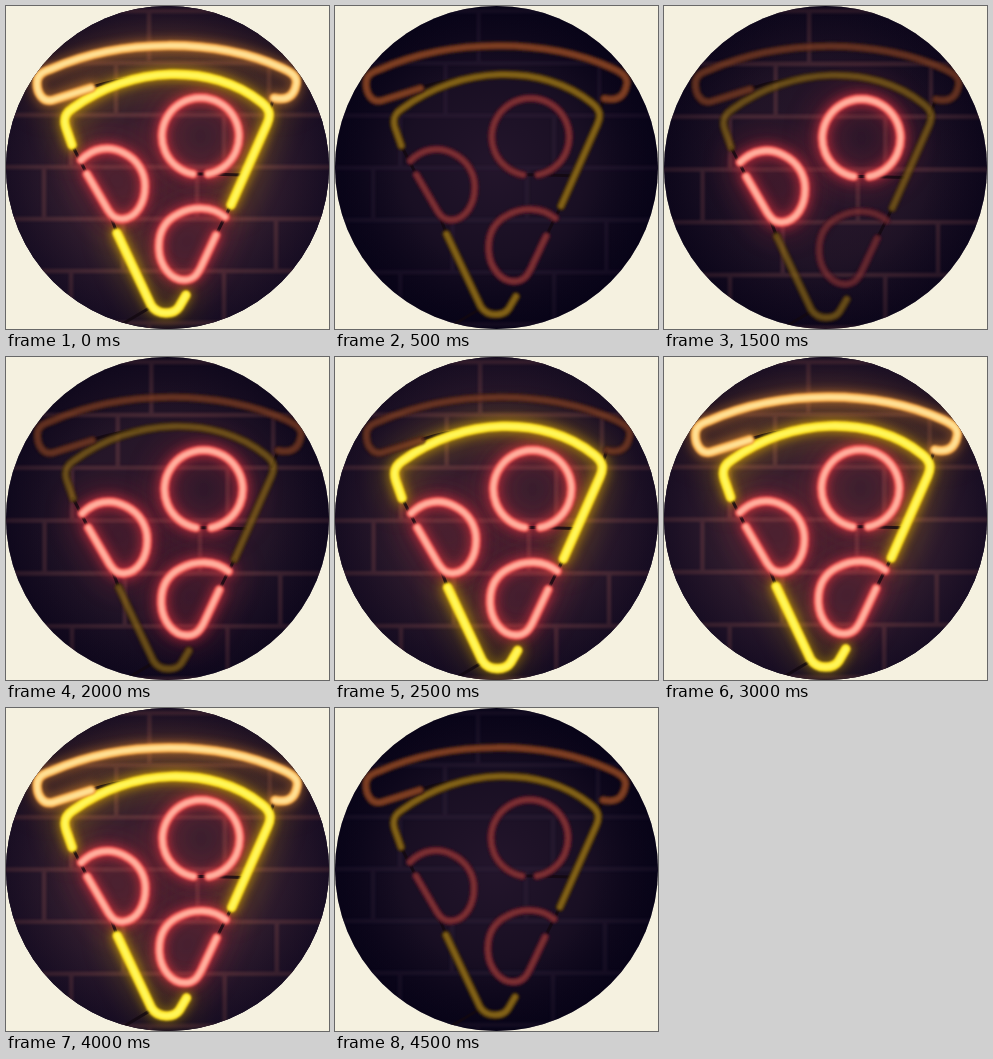
These frames come from a looping animation (323 px wide and 323 px high, 5000 ms). An HTML page:

```html
<!DOCTYPE html>
<html lang="en">
<head>
<meta charset="utf-8">
<title>Neon pizza sign</title>
<style>
html, body { margin: 0; width: 100%; height: 100%; overflow: hidden; background: #f5f1e0; }
svg { display: block; width: 100vw; height: 100vh; }
path { fill: none; stroke-linecap: round; stroke-linejoin: round; }
</style>
</head>
<body>
<svg viewBox="0 0 323 323">
  <defs>
    <clipPath id="disc"><circle cx="161.5" cy="161.5" r="161.5" shape-rendering="crispEdges"/></clipPath>
    <radialGradient id="dark" gradientUnits="userSpaceOnUse" cx="160" cy="160" r="165">
      <stop offset="0" stop-color="#23152b"/><stop offset=".55" stop-color="#190f23"/><stop offset="1" stop-color="#060317"/>
    </radialGradient>
    <radialGradient id="warm" gradientUnits="userSpaceOnUse" cx="160" cy="155" r="175">
      <stop offset="0" stop-color="#3b202e"/><stop offset=".6" stop-color="#321e2e"/><stop offset="1" stop-color="#1e1229"/>
    </radialGradient>
    <radialGradient id="edge" gradientUnits="userSpaceOnUse" cx="161" cy="160" r="163">
      <stop offset=".6" stop-color="#0a0418" stop-opacity="0"/><stop offset="1" stop-color="#0a0418" stop-opacity=".4"/>
    </radialGradient>
    <filter id="wide" filterUnits="userSpaceOnUse" x="-60" y="-60" width="450" height="450"><feGaussianBlur stdDeviation="15"/></filter>
    <filter id="near" filterUnits="userSpaceOnUse" x="-60" y="-60" width="450" height="450"><feGaussianBlur stdDeviation="5"/></filter>
    <filter id="soft" filterUnits="userSpaceOnUse" x="-60" y="-60" width="450" height="450"><feGaussianBlur stdDeviation=".9"/></filter>
  </defs>
  <g clip-path="url(#disc)">
    <rect width="323" height="323" fill="url(#dark)"/>
    <rect id="wallLight" width="323" height="323" fill="url(#warm)"/>
    <g id="sign">
      <path id="mortar" stroke-width="4.5" filter="url(#soft)"/>
      <g id="glows"></g>
      <rect width="330" height="330" fill="url(#edge)"/>
      <path stroke="#12080f" stroke-width="3" opacity=".8" d="M66 139L81 168M103 206L111 227M225 199L210 229M187 168H202L236 169M86 81Q108 74 130 72M268 92L262 108M108 323L145 301"/>
      <g id="tubes"></g>
    </g>
  </g>
</svg>
<script>
const STEP = 500;
const $ = id => document.getElementById(id);

function add(parent, tag, attrs) {
  const el = document.createElementNS('http://www.w3.org/2000/svg', tag);
  for (const key in attrs) el.setAttribute(key, attrs[key]);
  return parent.appendChild(el);
}

// Each palette: glow, lit rim, lit core, unlit rim, unlit core
const amber = ['#e88c2c', '#f2a546', '#ffdf92', '#4b2319', '#7b3e24'];
const yellow = ['#e0b000', '#fbdc1c', '#fff658', '#49330f', '#806019'];
const red = ['#e2323f', '#ec5854', '#ffad9c', '#4a1825', '#792d32'];

const parts = [
  { key: 'L', colors: red, d: 'M75 154C87 142 103 139 118 147C132 154 139 167 139 180C139 196 131 212 116 213C109 213 106 210 102 204L81 168' },
  { key: 'R', colors: red, d: 'M187 168A38.5 38.5 0 1 1 202 168' },
  { key: 'B', colors: red, d: 'M219 211C206 200 187 200 172 208C158 215 152 228 153 244C154 260 165 274 178 274C187 274 191 269 195 261L210 229' },
  { key: 'S', colors: yellow, d: 'M66 139L60 122C57 113 59 107 67 102C125 59 206 57 255 96C264 103 265 109 261 118L225 199M111 227L145 299Q150 307 160 307Q169 307 173 301L180 289' },
  { key: 'C', colors: amber, d: 'M85 82L47 94C36 97 31 86 31 77C31 69 36 66 45 63C115 32 210 32 276 62C287 67 292 71 290 79C288 89 282 95 268 92' }
];

// Lit parts, scale of the sign, wall brightness
const steps = [
  ['LRBSC', 1, 1],
  ['', 1.005, 0],
  ['L', 1.01, .15],
  ['LR', 1.015, .3],
  ['LRB', 1.016, .45],
  ['LRBS', 1.015, .85],
  ['LRBSC', 1.01, 1],
  ['', 1.006, 0],
  ['LRBSC', 1.003, 1],
  ['', 1, 0]
];

function brickLines() {
  let d = '';
  [143, 110, 65, 38, 117, 65, 143].forEach((offset, row) => {
    const y = 5 + row * 52;
    d += `M-10 ${y}H340`;
    for (let x = offset; x < 330; x += 153) d += `M${x} ${y}v52`;
  });
  return d;
}
$('mortar').setAttribute('d', brickLines());

for (const part of parts) {
  const [glow, rim, core, dimRim, dimCore] = part.colors;
  const d = part.d;
  part.glow = add($('glows'), 'g');
  add(part.glow, 'path', { d, stroke: glow, 'stroke-width': 22, opacity: .28, filter: 'url(#wide)' });
  add(part.glow, 'path', { d, stroke: glow, 'stroke-width': 13, opacity: .65, filter: 'url(#near)' });

  const tube = (rimColor, coreColor, rimWidth, coreWidth) => {
    const group = add($('tubes'), 'g');
    add(group, 'path', { d, stroke: rimColor, 'stroke-width': rimWidth, filter: 'url(#soft)' });
    add(group, 'path', { d, stroke: coreColor, 'stroke-width': coreWidth, filter: 'url(#soft)' });
    return group;
  };
  part.off = tube(dimRim, dimCore, 9, 5);
  part.on = tube(rim, core, 9.5, 5.5);
}

let shown = -1;
function draw() {
  const index = Math.floor(performance.now() / STEP) % steps.length;
  if (index !== shown) {
    shown = index;
    const [lit, scale, light] = steps[index];
    $('sign').setAttribute('transform', `scale(${scale})`);
    $('wallLight').setAttribute('opacity', light);
    $('mortar').setAttribute('stroke', light ? '#6b3d43' : '#33213a');
    $('mortar').setAttribute('opacity', .4 + light * .2);
    for (const { key, glow, on, off } of parts) {
      const isLit = lit.includes(key);
      glow.style.display = on.style.display = isLit ? '' : 'none';
      off.style.display = isLit ? 'none' : '';
      off.setAttribute('opacity', lit ? .75 : 1);
    }
  }
  requestAnimationFrame(draw);
}
draw();
</script>
</body>
</html>
```
